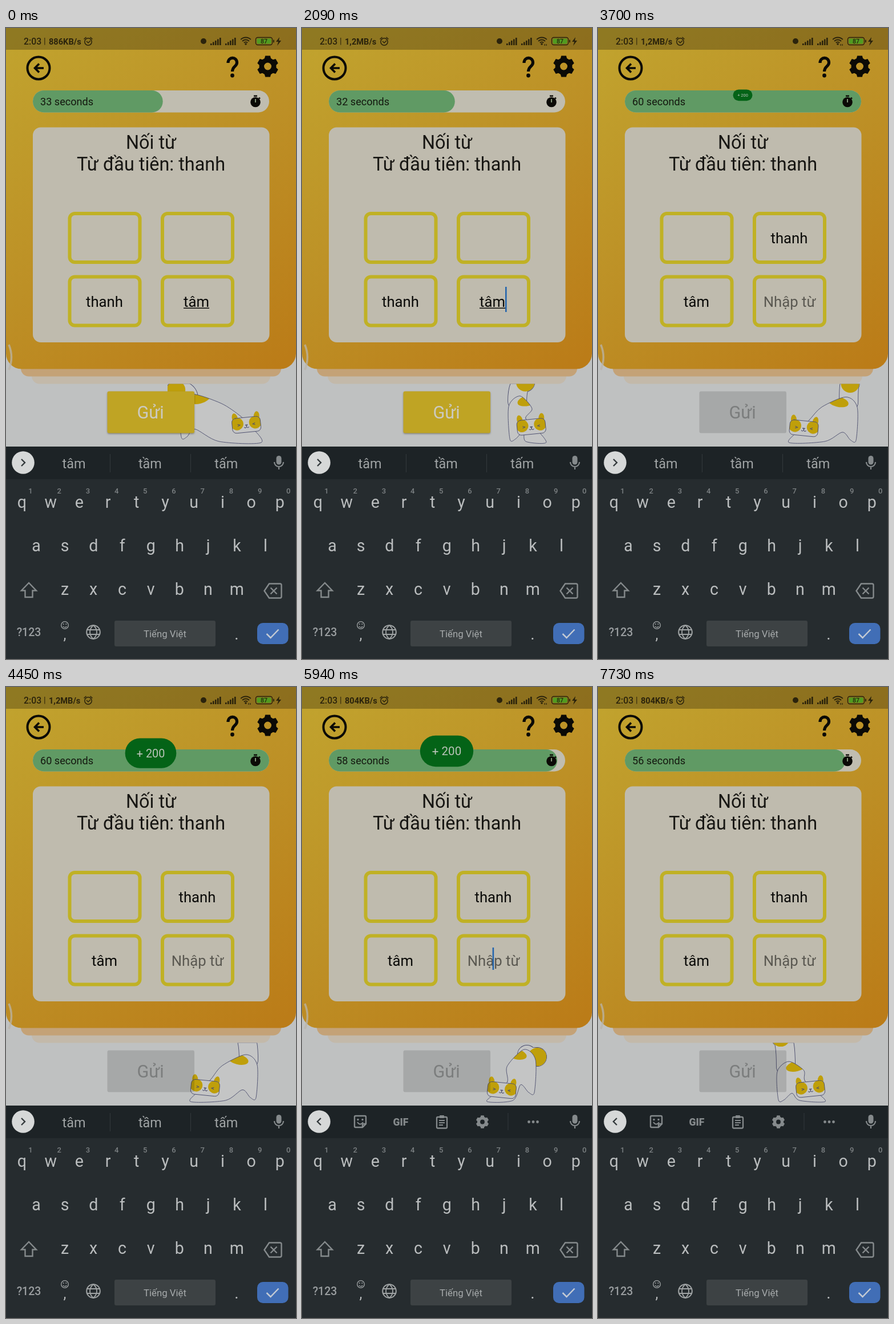
An HTML page with a canvas that plays this animation: 508 by 1102 pixels, repeating every 7.79 s.

```html
<!DOCTYPE html>
<html lang="vi">
<head>
<meta charset="utf-8">
<title>Nối từ</title>
<style>
html, body { margin: 0; width: 100%; height: 100%; overflow: hidden; background: #bfc1c1; }
canvas { display: block; width: 508px; height: 1102px; }
</style>
</head>
<body>
<canvas id="stage" width="508" height="1102"></canvas>
<script>
const ctx = document.getElementById('stage').getContext('2d');
const LOOP = 7790, PRESS = 1270, ANSWER = 3640, TOOLS = 4700, TAU = Math.PI * 2;
const INK = '#0b0a06', YELLOW = '#bf9f0a', NAVY = '#4a4c6c', FUR = '#c4c5c5';
const ICON = '#858a8c', KEY = '#babdbe', DIM = '#a0a4a5';
const clamp = (v, lo = 0, hi = 1) => Math.max(lo, Math.min(hi, v));
const mix = (a, b, k) => a + (b - a) * k;
const easeOut = v => 1 - (1 - clamp(v)) ** 3;

function text(s, x, y, size, color, align = 'center', weight = 400) {
  ctx.font = `${weight} ${size}px Roboto, sans-serif`;
  ctx.textAlign = align;
  ctx.fillStyle = color;
  ctx.fillText(s, x, y);
}
function box(x, y, w, h, r, color) {
  ctx.beginPath();
  ctx.roundRect(x, y, w, h, r);
  ctx.fillStyle = color;
  ctx.fill();
}
function frame(x, y, w, h, r, color, width) {
  ctx.beginPath();
  ctx.roundRect(x, y, w, h, r);
  ctx.strokeStyle = color;
  ctx.lineWidth = width;
  ctx.stroke();
}
function oval(x, y, rx, ry, color, turn = 0) {
  ctx.beginPath();
  ctx.ellipse(x, y, rx, ry, turn, 0, TAU);
  ctx.fillStyle = color;
  ctx.fill();
}
const dot = (x, y, r, color) => oval(x, y, r, r, color);
function ring(x, y, r, color, width, from = 0, to = TAU) {
  ctx.beginPath();
  ctx.arc(x, y, r, from, to);
  ctx.strokeStyle = color;
  ctx.lineWidth = width;
  ctx.stroke();
}
function line(d, color, width) {
  ctx.strokeStyle = color;
  ctx.lineWidth = width;
  ctx.stroke(new Path2D(d));
}
function gear(x, y, r, color) {
  ctx.beginPath();
  for (let i = 0; i < 6; i++) {
    const a = i * TAU / 6 - Math.PI / 2;
    for (const side of [-1, 1])
      for (const [da, k] of side < 0 ? [[.38, .79], [.23, 1]] : [[.23, 1], [.38, .79]])
        ctx.lineTo(x + Math.cos(a + side * da) * r * k, y + Math.sin(a + side * da) * r * k);
  }
  ctx.closePath();
  ctx.moveTo(x + r * .34, y);
  ctx.arc(x, y, r * .34, 0, TAU);
  ctx.fillStyle = color;
  ctx.fill('evenodd');
}

// The cat is built from three joints; the rest of the body follows by rule.
const moves = [
  { at: 0, head: [421, 692], rump: [325, 660], tail: [298, 632] },
  { at: 1390, head: [426, 694], rump: [325, 660], tail: [318, 598] },
  { at: 2910, head: [373, 697], rump: [449, 668], tail: [477, 643] },
  { at: 4450, head: [349, 699], rump: [420, 663], tail: [408, 600] },
  { at: 5940, head: [350, 703], rump: [389, 654], tail: [412, 646] },
  { at: 6940, head: [341, 682], rump: [350, 630], tail: [290, 605] },
  { at: 7730, head: [372, 701], rump: [334, 675], tail: [320, 612] },
];
function joints(t) {
  const i = clamp(moves.findIndex(m => m.at > t) - 1, 0, moves.length - 2);
  const a = moves[t >= moves.at(-1).at ? moves.length - 2 : i], b = moves[moves.indexOf(a) + 1];
  const k = clamp((t - a.at) / (b.at - a.at));
  const joint = name => a[name].map((v, n) => mix(v, b[name][n], k));
  return [joint('head'), joint('rump'), joint('tail')];
}
function smooth(pts) {
  const at = i => pts[(i + pts.length) % pts.length], path = new Path2D();
  path.moveTo(...pts[0]);
  pts.forEach((p, i) => {
    const q = at(i + 1), before = at(i - 1), after = at(i + 2);
    path.bezierCurveTo(
      p[0] + (q[0] - before[0]) / 7, p[1] + (q[1] - before[1]) / 7,
      q[0] - (after[0] - p[0]) / 7, q[1] - (after[1] - p[1]) / 7, ...q);
  });
  return path;
}
function bodyShape([hx, hy], [rx, ry], dir) {
  const dx = hx - rx, dy = hy - ry, arch = 13 * dir / Math.hypot(dx, dy);
  const midX = (hx + rx) / 2, midY = (hy + ry) / 2;
  const footX = rx - dir * 14, footY = Math.min(ry + 54, 721);
  return smooth([
    [hx - dir * 10, hy - 14],
    [midX + dy * arch, midY - 8 - dx * arch],
    [rx, ry - 21],
    [rx - dir * 20, ry - 3],
    [footX - dir * 4, footY],
    [footX + dir * 6, footY],
    [rx + dir * 6, mix(ry, footY, .75)],
    [midX, 722],
    [hx + dir * 26, 724],
    [hx + dir * 8, hy + 4],
  ]);
}
function catHead(x, y, turn) {
  ctx.save();
  ctx.translate(x, y);
  ctx.rotate(turn);
  for (const s of [-1, 1]) oval(s * 19, -12, 5, 9, YELLOW, s * .15);
  box(-25, -12, 50, 26, 7, FUR);
  ctx.save();
  ctx.clip();
  for (const s of [-1, 1]) oval(s * 16, -2, 11, 11, YELLOW, s * .3);
  ctx.restore();
  frame(-25, -12, 50, 26, 7, NAVY, .9);
  line('M-15-1l4 1.500-4 1.500M15-1l-4 1.500 4 1.500M-2 1h4l-2 2zM-4 5q2 3 4-1q2 4 4 1', NAVY, 1);
  ctx.restore();
}
function cat(t) {
  const [head, rump, tip] = joints(t);
  const dir = clamp((head[0] - rump[0]) / 9, -1, 1), [rx, ry] = rump;
  ctx.save();
  ctx.beginPath();
  ctx.rect(283, 621.5, 225, 109.5);
  ctx.clip();
  ctx.lineCap = ctx.lineJoin = 'round';
  const tail = `M${rx - dir * 5} ${ry - 12}Q${rx - dir * 5} ${tip[1]} ${tip}`;
  line(tail, NAVY, 34);
  line(tail, FUR, 32.2);
  line(`M${tip}l.1 0`, YELLOW, 32.2);
  const body = bodyShape(head, rump, dir);
  ctx.fillStyle = FUR;
  ctx.fill(body);
  ctx.save();
  ctx.clip(body);
  oval(rx + dir * 14, ry - 13, 19, 9, YELLOW, dir * -.25);
  ctx.restore();
  ctx.strokeStyle = NAVY;
  ctx.lineWidth = .9;
  ctx.stroke(body);
  catHead(...head, dir * -.1);
  ctx.restore();
}

function background() {
  ctx.fillStyle = '#bfc1c1';
  ctx.fillRect(0, 0, 508, 1102);
  box(45, 585, 418, 36.5, [0, 0, 14, 14], '#c3b9aa');
  box(26, 580, 456, 28.5, [0, 0, 14, 14], '#c4a277');
  const g = ctx.createLinearGradient(40, 0, 468, 596);
  g.addColorStop(0, '#c1a32e');
  g.addColorStop(.5, '#bd9026');
  g.addColorStop(1, '#bb7c18');
  box(0, 0, 508, 595.5, [0, 0, 27, 27], g);
  ctx.fillStyle = 'rgba(0,0,0,.26)';
  ctx.fillRect(0, 0, 508, 38);
  line('M5 553Q14 575 5 597', 'rgba(185,180,170,.75)', 3.5);
}

function statusBar(t) {
  const c = '#2b230c';
  text('2:03', 31, 29, 15.8, c, 'left', 500);
  text('|', 66, 28, 15, c, 'left');
  text(t < 950 ? '886KB/s' : t < 4950 ? '1,2MB/s' : '804KB/s', 75, 29, 14.6, c, 'left', 700);
  ring(144, 24, 6.2, c, 1.5);
  line('M136.500 19.500l4-3.500M151.500 19.500l-4-3.500M141 23l3 3 4-4', c, 1.5);
  dot(346, 23, 5, c);
  for (const x of [358, 384])
    for (let i = 0; i < 5; i++) box(x + i * 4, 27 - i * 2.5, 2.6, 3 + i * 2.5, 0, c);
  for (let r = 4.5; r < 13; r += 4) ring(420, 29, r, c, 2, -2.35, -.79);
  dot(420, 28, 1.8, c);
  if (t > 2000) line('M425 28v3M428 28v3', c, 1.2);
  frame(437.5, 16.5, 29, 13, 3.5, c, 1.4);
  box(439.5, 18.5, 25, 9, 2, '#519b20');
  box(468, 20.5, 1.8, 5, 1, c);
  text('87', 452, 27, 10.5, c, 'center', 500);
  ctx.fill(new Path2D('M479 16l-6 8h4l-2 7 7-9h-4z'));
}

function header() {
  ctx.lineCap = 'butt';
  ctx.lineJoin = 'miter';
  ring(57, 70, 19.5, INK, 4);
  line('M66 70H51M58 62.500L50.500 70L58 77.500', INK, 3.6);
  line('M389 61C389 49.500 404.500 49.500 404.500 60.500C404.500 67 396.500 67 396.500 76', INK, 5.2);
  dot(396.5, 83, 3.4, INK);
  gear(458.5, 67, 19, INK);
}

function progress(t) {
  const tick = Math.floor((t - 600) / 1000);
  const left = t < ANSWER ? 33 - Math.max(0, tick) : 63 - Math.max(3, tick);
  box(47, 109, 414, 38.5, 19.2, '#c0bdb0');
  box(47, 109, 414 * left / 60, 38.5, 19.2, '#609a64');
  text(left + ' seconds', 60, 134.5, 18.1, '#14180f', 'left');
  dot(437, 129.5, 8.8, INK);
  box(434, 117.5, 6, 2.4, 0, INK);
  line('M443 121.500l2 2', INK, 2.4);
  line('M437 124v6', '#8fa385', 1.8);
}

function card(t) {
  const done = t >= ANSWER, c = '#0a0a08', word = (s, x, y, color = c) => text(s, x, y, 25.7, color);
  box(47, 173.5, 414.5, 375.5, 14, '#bfbbae');
  text('Nối từ', 254, 211, 32.4, '#171613');
  text('Từ đầu tiên: thanh', 254, 248.5, 32.4, '#171613');
  for (const x of [111.5, 274])
    for (const y of [324, 434.5]) frame(x, y, 123, 85, 9, '#c0b125', 6);
  word(done ? 'tâm' : 'thanh', 172.5, 486.5);
  if (done) {
    word('thanh', 335, 376);
    word('Nhập từ', 335.5, 486.5, '#5a5851');
  } else {
    word('tâm', 333.5, 486.5);
    box(311, 488.5, 45, 1.6, 0, c);
  }
  const caretOn = t > 500 && (t + 100) % 1000 < 500;
  if (caretOn) box(done ? 333.6 : 356, done ? 455 : 452, 2.6, done ? 39 : 44, 0, '#2465ad');
}

function sendButton(t) {
  const shape = [177.5, 634.5, 152.5, 73, 3];
  if (t >= ANSWER) {
    box(...shape, 'rgba(0,0,0,.13)');
    text('Gửi', 253, 681.5, 30.6, '#7b7d7d');
    return;
  }
  const k = (t - PRESS) / 530, pressed = k > 0 && k < 1;
  ctx.save();
  ctx.shadowColor = pressed ? 'rgba(0,0,0,.45)' : 'rgba(0,0,0,.32)';
  ctx.shadowBlur = pressed ? 10 : 3;
  ctx.shadowOffsetY = pressed ? 5 : 1.5;
  box(...shape, '#bfa424');
  ctx.restore();
  if (pressed) {
    const glow = a => `rgba(205,205,190,${a * Math.min(1, 2 - 2 * k)})`;
    ctx.save();
    box(...shape, glow(.13));
    ctx.clip();
    dot(258.5 - k * 2, 673 - k, 18 + k * 54, glow(.2));
    ctx.restore();
  }
  text('Gửi', 253, 681.5, 30.6, '#cccac0');
}

function bonus(t) {
  const age = t - ANSWER, fade = clamp((6450 - t) / 250);
  if (age < 0 || !fade) return;
  ctx.save();
  ctx.globalAlpha = fade;
  ctx.translate(253.5, 117.5 - age * .0024);
  const k = easeOut(age / 400) * (.94 + age * .000026);
  ctx.scale(k, k);
  box(-46.7, -27.2, 93.4, 54.4, 27.2, '#046317');
  text('+ 200', 0, 7.5, 20.6, '#bac4ba');
  ctx.restore();
}

function suggestions() {
  ['tâm', 'tầm', 'tấm'].forEach((word, i) => text(word, 119 + i * 133.4, 768.5, 23.4, DIM));
  for (const x of [182, 323]) box(x, 744, 1, 32, 0, '#33393c');
}
function toolbar() {
  line('M94 749h16q2 0 2 2v12l-6 6h-12q-2 0-2-2v-16q0-2 2-2zM112 763h-4q-2 0-2 2v4', ICON, 2.4);
  line('M97 760q5 7 10 0', ICON, 2);
  for (const x of [98, 106]) dot(x, 755.5, 1.7, ICON);
  text('GIF', 173, 765.5, 17.5, ICON, 'center', 900);
  frame(236, 751, 18, 19.5, 2, ICON, 2.3);
  box(241, 748, 8, 5, 1, ICON);
  line('M240 757h10M240 761h10M240 765h7', ICON, 1.8);
  gear(316, 759.5, 11.5, ICON);
  box(360.5, 744, 1, 30, 0, '#33393c');
  for (let i = -1; i < 2; i++) dot(405 + i * 7.5, 759.5, 2.4, ICON);
}
function strip(t) {
  const tools = t >= TOOLS;
  dot(30, 759, 19.8, '#d6d8d8');
  line(tools ? 'M33 753l-6 6 6 6' : 'M27 753l6 6-6 6', '#343a3d', 2.4);
  box(473.5, 747, 9, 15.5, 4.5, ICON);
  line('M470 758a8 8 0 0 0 16 0M478 766v5', ICON, 2.2);
  tools ? toolbar() : suggestions();
}

function row(keys, x, y, size = 28.6, color = KEY, weight = 400) {
  [...keys].forEach((ch, i) => text(ch, x + i * 50.2, y, size, color, 'center', weight));
}
function keyboard(t) {
  ctx.fillStyle = '#262c2f';
  ctx.fillRect(0, 731, 508, 371);
  ctx.fillStyle = '#1d2326';
  ctx.fillRect(0, 731, 508, 57);
  strip(t);
  row('qwertyuiop', 28, 837.5);
  row('1234567890', 43, 812.5, 13, '#7c8183', 500);
  row('asdfghjkl', 53, 913.5);
  row('zxcvbnm', 103, 989.5);
  line('M40 969L27 982.500H33.500V994H46.500V982.500H53z', ICON, 2.4);
  line('M461 970.500H480q2.500 0 2.500 2.500V993q0 2.500-2.500 2.500H461L452.500 983zM463.500 977.500l11 11M474.500 977.500l-11 11', ICON, 2.4);
  text('?123', 40, 1062, 19.5, '#9a9ea0', 'center', 500);
  ring(103, 1043, 6.3, DIM, 1.3);
  for (const s of [-1, 1]) dot(103 + s * 2.3, 1041, 1, DIM);
  ring(103, 1043.5, 3.3, DIM, 1.2, .4, 2.74);
  text(',', 103, 1068, 25, KEY);
  ring(153, 1055, 11.8, DIM, 2);
  line('M142 1051H164M142 1059H164M153 1043C145 1050 145 1060 153 1067C161 1060 161 1050 153 1043', DIM, 1.8);
  box(190, 1035, 177, 45, 3, '#3d4244');
  text('Tiếng Việt', 278.5, 1063.5, 16.8, '#a7abac');
  text('.', 404, 1068, 28, KEY);
  box(440, 1039, 54.5, 37, 10, '#416eb6');
  line('M456.500 1058l7 7 14-14.500', '#c3cad4', 2.5);
}

function draw(now) {
  const t = now % LOOP;
  background();
  statusBar(t);
  header();
  progress(t);
  card(t);
  cat(t);
  sendButton(t);
  bonus(t);
  keyboard(t);
}
let start;
function tick(now) {
  start ??= now;
  draw(now - start);
  requestAnimationFrame(tick);
}
draw(0);
requestAnimationFrame(tick);
</script>
</body>
</html>
```
